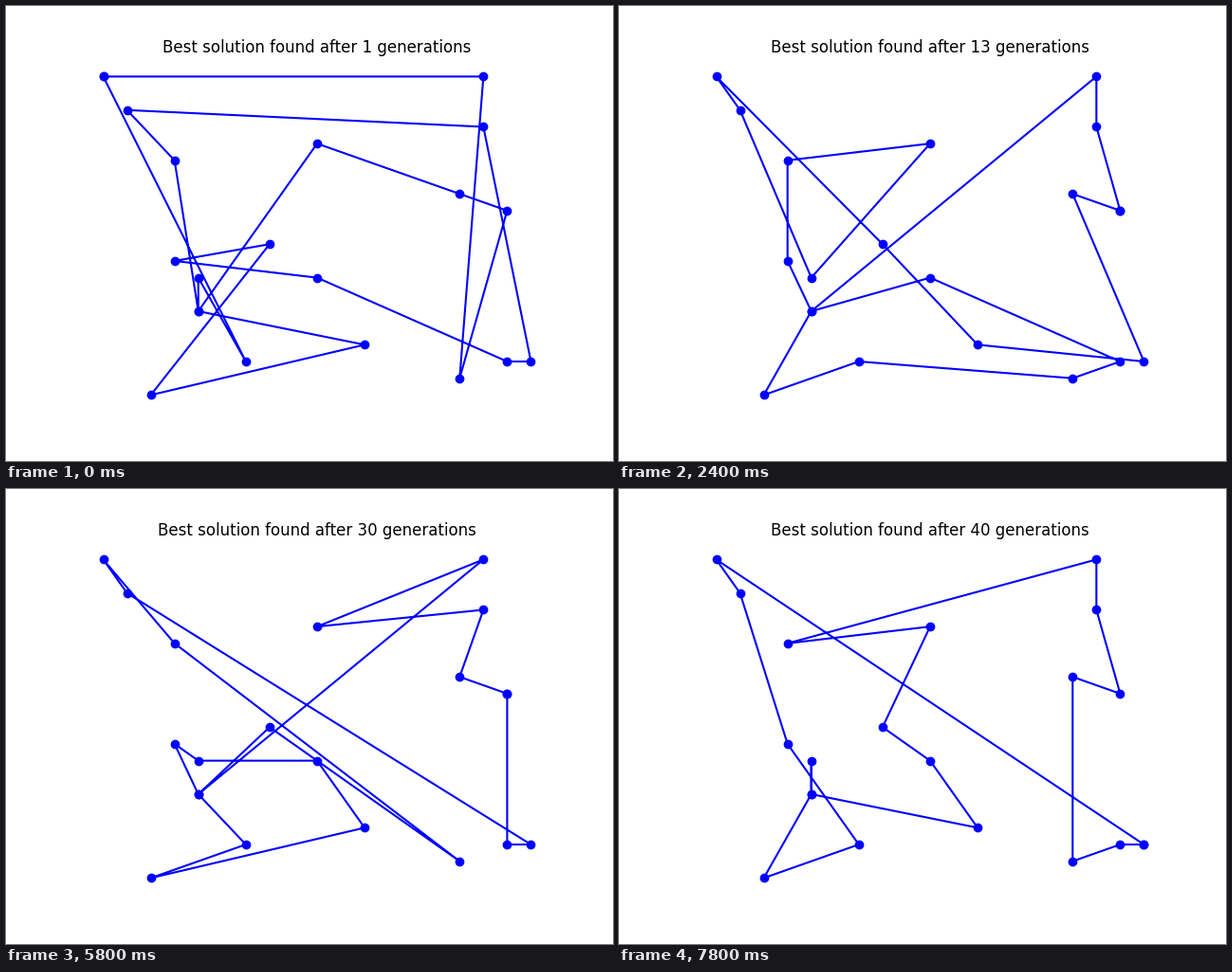
Write a matplotlib script that moves like this. It is 640 px wide and 480 px high and loops after 8000 ms.

```python
import matplotlib.pyplot as plt
from matplotlib.animation import FuncAnimation

GENERATIONS = 40
INTERVAL = 200

CITIES = {
    "A": (0, 19), "B": (1, 17), "C": (3, 14), "D": (9, 15), "E": (16, 19),
    "F": (16, 16), "G": (15, 12), "H": (17, 11), "I": (7, 9), "J": (3, 8),
    "K": (4, 7), "L": (9, 7), "M": (4, 5), "N": (11, 3), "O": (6, 2),
    "P": (17, 2), "Q": (18, 2), "R": (15, 1), "S": (2, 0),
}

# First generation of each best tour; two cities share the spot M.
TOURS = {
    1: "AERHGDMCBFQPLJISNMKO",
    2: "SNMDEFHGRPQLOKMJCABI",
    4: "DMSNMLOKIBACJRPQGHFE",
    8: "QGOHFEDMSNMLKIBACJRP",
    11: "HGQNIABKDCJMSORPLMEF",
    15: "QNIABCKDJMOSRPLMEFHG",
    21: "HGFDEMOSNLKJMIRCABQP",
    31: "HPQRLDMINSMOKJABCFEG",
    33: "HEFABCJKMOSRNIMDLPQG",
    37: "QABJOSMKMNLIDCEFHGRP",
}

fig, ax = plt.subplots(figsize=(6.4, 4.8), dpi=100)
ax.axis("off")
line, = ax.plot(*zip(*CITIES.values()), "bo-")
title = ax.set_title("")


def best_tour(generation):
    return TOURS[max(g for g in TOURS if g <= generation)]


def draw(frame):
    generation = frame + 1
    tour = best_tour(generation)
    line.set_data(*zip(*(CITIES[c] for c in tour + tour[0])))
    title.set_text(f"Best solution found after {generation} generations")
    return line, title


anim = FuncAnimation(fig, draw, frames=GENERATIONS, interval=INTERVAL,
                     repeat=True, repeat_delay=0)
plt.show()
```
